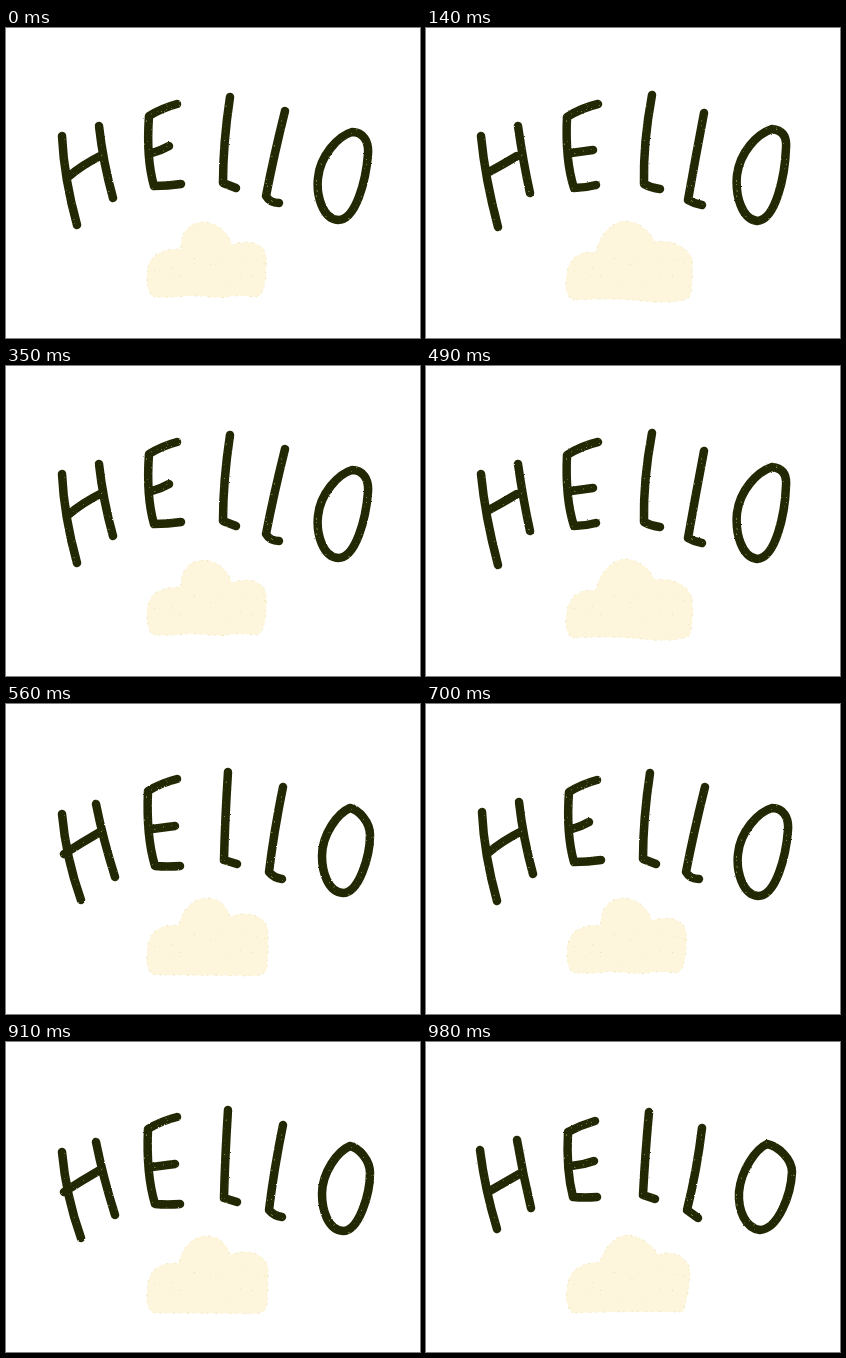
Recreate the animation shown at these times as an HTML page. Size 414 by 310 pixels, loop 1.05 s.

```html
<!DOCTYPE html>
<html lang="en">
<head>
<meta charset="utf-8">
<title>Hello</title>
<style>
html, body { margin: 0; width: 100%; height: 100%; overflow: hidden; background: #fff; }
svg { display: block; width: 100vw; height: 100vh; }
.pose { opacity: 0; animation: 350ms step-end infinite; }
.a { animation-name: first; }
.b { animation-name: second; }
.c { animation-name: third; }
.d { animation-name: fourth; }
.ink { fill: none; stroke: #232804; stroke-width: 8.5; stroke-linecap: round; stroke-linejoin: round; filter: url(#grain); }
.cloud { fill: #fef6dc; stroke: #ebdfb0; stroke-width: .8; stroke-dasharray: 1 4 2 7; filter: url(#paper); }
@keyframes first { 0% { opacity: 1; } 40%, 100% { opacity: 0; } }
@keyframes second { 0% { opacity: 0; } 40% { opacity: 1; } 60%, 100% { opacity: 0; } }
@keyframes third { 0% { opacity: 0; } 60% { opacity: 1; } 80%, 100% { opacity: 0; } }
@keyframes fourth { 0% { opacity: 0; } 80%, 100% { opacity: 1; } }
</style>
</head>
<body>
<svg viewBox="0 0 414 310" role="img" aria-label="Hello">
  <defs>
    <filter id="grain" filterUnits="userSpaceOnUse" x="0" y="0" width="414" height="310" color-interpolation-filters="sRGB">
      <feTurbulence type="fractalNoise" baseFrequency=".4" numOctaves="2" seed="4" result="noise"/>
      <feDisplacementMap in="SourceGraphic" in2="noise" scale="1.7" xChannelSelector="R" yChannelSelector="G" result="rough"/>
      <feColorMatrix in="noise" values="0 0 0 0 .5  0 0 0 0 .5  0 0 0 0 .25  0 0 9 0 -6.4"/>
      <feComposite in2="rough" operator="in" result="specks"/>
      <feMerge><feMergeNode in="rough"/><feMergeNode in="specks"/></feMerge>
    </filter>
    <filter id="paper" filterUnits="userSpaceOnUse" x="0" y="0" width="414" height="310" color-interpolation-filters="sRGB">
      <feTurbulence type="fractalNoise" baseFrequency=".5" numOctaves="2" seed="9" result="noise"/>
      <feDisplacementMap in="SourceGraphic" in2="noise" scale="1.6" xChannelSelector="R" yChannelSelector="G" result="rough"/>
      <feColorMatrix in="noise" values="0 0 0 0 .9  0 0 0 0 .82  0 0 0 0 .56  0 0 9 0 -6.7"/>
      <feComposite in2="rough" operator="in" result="specks"/>
      <feMerge><feMergeNode in="rough"/><feMergeNode in="specks"/></feMerge>
    </filter>
  </defs>

  <g class="pose a">
    <path class="cloud" d="M149 269C143 268 141 259 141 250C141 230 149 221 175 221C174 204 184 194 198 194C212 195 222 204 226 217C240 211 257 214 260 227C261 242 260 269 250 269C238 268 230 267 222 269C208 271 194 267 180 268Q165 270 149 269Z"/>
    <g class="ink">
      <path d="M56 108Q58 150 71 197M93 98Q97 134 107 170M62 149Q76 137 96 127"/>
      <path d="M171 76Q156 80 143 88Q140 130 148 158Q162 158 175 156M146 125Q154 123 163 118"/>
      <path d="M224 69Q217 115 217 155L230 160"/>
      <path d="M279 83Q268 127 260 168Q264 175 273 175"/>
      <path d="M346 104C357 104 363 113 362 126C360 152 350 192 332 192C317 191 310 168 312 150C314 128 332 108 346 104Z"/>
    </g>
  </g>

  <g class="pose b">
    <path class="cloud" d="M148 272C142 271 139 262 140 253C141 233 149 223 170 224C174 206 186 193 200 193C214 194 224 203 229 214C245 211 262 219 266 231C267 243 267 257 264 269C258 274 240 275 226 274Q188 269 148 272Z"/>
    <g class="ink">
      <path d="M55 108Q59 150 72 199M92 98Q97 133 104 165M63 144Q76 137 91 128"/>
      <path d="M172 76Q155 80 141 89Q139 132 148 160Q159 160 170 157M145 125L167 122"/>
      <path d="M226 67Q217 115 218 156Q225 160 234 161"/>
      <path d="M278 85Q270 127 262 172Q269 176 276 177"/>
      <path d="M346 101C355 102 361 107 360 120C359 147 350 192 331 193C316 191 309 168 311 147C314 124 331 106 346 101Z"/>
    </g>
  </g>

  <g class="pose c">
    <path class="cloud" d="M148 271C142 268 140 260 141 251C141 230 150 220 173 221C176 205 188 193 202 194C214 195 221 202 224 213C241 206 258 211 262 225C262 239 263 254 260 267C257 273 241 272 230 271.500Q188 271 148 271Z"/>
    <g class="ink">
      <path d="M56 110Q60 154 75 196M90 100Q97 135 109 173M58 150Q75 139 94 128"/>
      <path d="M171 75Q155 79 142 87Q140 132 149 162Q162 163 174 162M146 125L169 122"/>
      <path d="M222 68Q219 115 218 156L231 160"/>
      <path d="M277 83Q268 127 263 168Q268 174 276 175"/>
      <path d="M344 104C353 106 364 118 364 131C364 152 353 189 337 189C322 188 316 168 316 152C316 130 332 109 344 104Z"/>
    </g>
  </g>

  <g class="pose d">
    <path class="cloud" d="M146 271C141 265 139 256 141 247C142 230 152 221 174 220C178 206 189 193 202 193C216 195 227 203 232 213C247 207 262 215 264 228C264 243 261 258 257 270Q201 269 146 271Z"/>
    <g class="ink">
      <path d="M54 108Q59 148 71 187M91 98Q97 133 105 166M62 150L95 131"/>
      <path d="M169 79Q155 83 142 90Q140 128 147 155Q159 156 171 155M145 124Q157 123 168 119"/>
      <path d="M223 70Q219 114 217 153L229 157"/>
      <path d="M276 86Q271 128 261 168L272 176"/>
      <path d="M341 102C352 104 366 117 366 130C365 153 352 187 334 188C319 186 312 168 313 150C315 128 330 107 341 102Z"/>
    </g>
  </g>
</svg>
</body>
</html>
```
